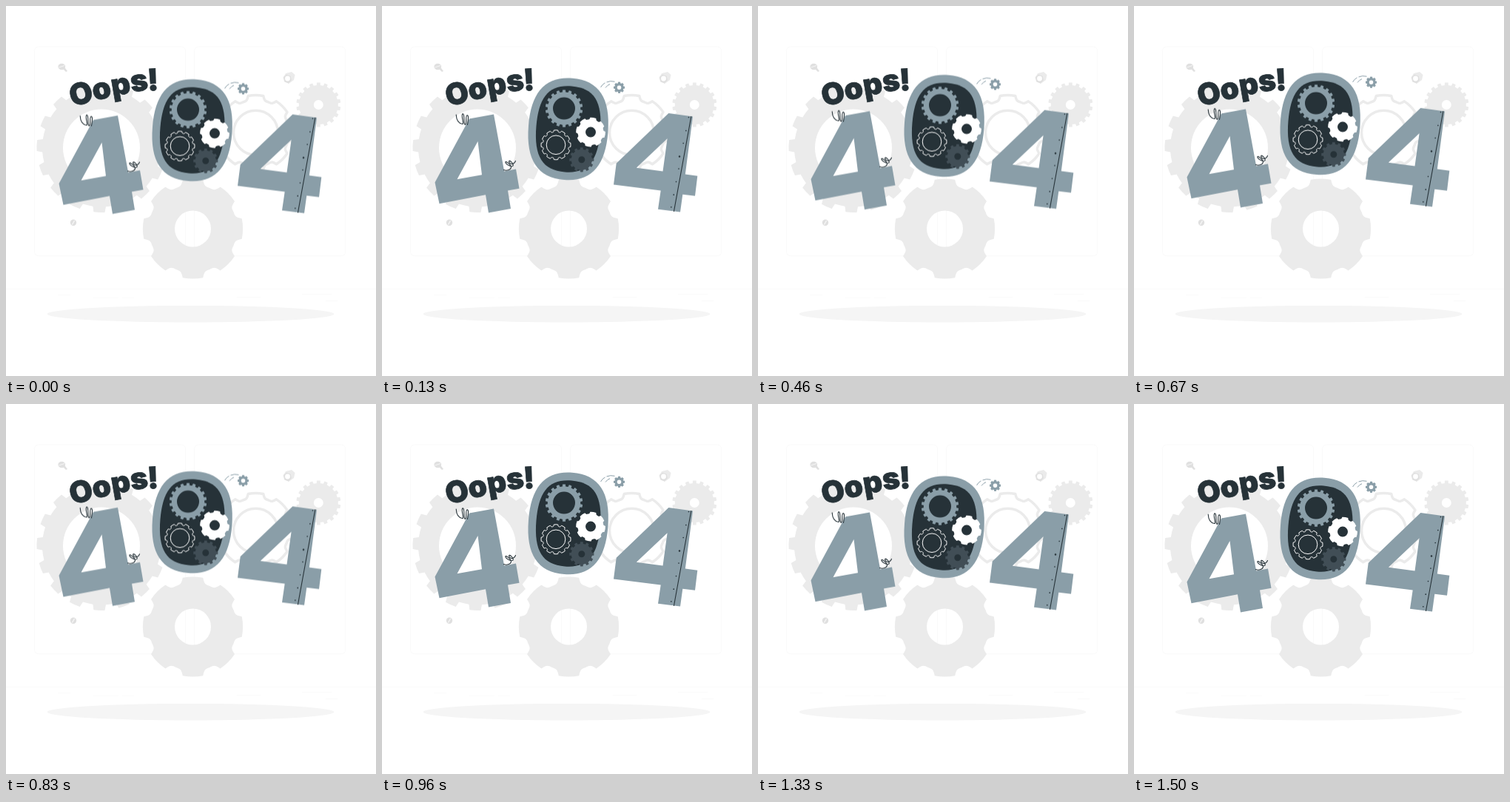
Recreate the animation shown at these times as an HTML page. Size 500 px wide and 500 px high, loop 1.54 s.

```html
<!DOCTYPE html>
<html lang="en">
<head>
<meta charset="utf-8">
<title>404</title>
<style>
  html, body { margin: 0; width: 100%; height: 100%; overflow: hidden; background: #fff; }
  svg { display: block; width: 100%; height: 100%; }
  .pale { fill: #ebebeb; }
  .paleLine { fill: none; stroke: #ebebeb; }
  .slate { fill: #8a9ea8; fill-rule: evenodd; }
  .dark { fill: #263238; }
  .ink { fill: none; stroke: #263238; stroke-linecap: round; }
  text { font: 900 40.5px Inter, "Open Sans", sans-serif; text-anchor: middle; fill: #263238; stroke: #263238; stroke-width: .7px; }
</style>
</head>
<body>
<svg viewBox="0 0 500 500">
  <g class="paleLine" stroke-width=".25">
    <path d="M0 382.5H500M70 390.5H87M118 394.2H152M157 394.2H173M312 393.5H344M400 389.5H440M432 398.5H448"/>
    <rect x="38.4" y="55.1" width="204.2" height="282.6" rx="5.6"/>
    <rect x="254.6" y="55.1" width="204.2" height="282.6" rx="5.6"/>
  </g>
  <ellipse cx="249.5" cy="416.2" rx="193.9" ry="11.3" fill="#f5f5f5"/>
  <g id="backGears"></g>
  <g fill="#e0e0e0">
    <path d="M76 84L79 82.5L83 88L81 89Z"/>
    <ellipse cx="75.3" cy="82" rx="4.9" ry="4.2"/>
    <path d="M71.5 83L79 80.5" stroke="#fff" stroke-width=".7"/>
    <circle cx="91" cy="292.7" r="4.2"/>
    <path d="M89.5 295.5L92.5 290" stroke="#fff"/>
    <path d="M378 91L386 89L390.5 93L389 100L382 105L376 102L374.500 97Z" fill="#ebebeb"/>
    <path d="M375 96L379 92.5L384.5 94.5L386 100L382 104.500L376.500 102.500Z"/>
    <circle cx="380.5" cy="98" r="3.4" fill="#fff"/>
  </g>
  <g id="word"></g>
  <g id="digits">
    <path class="slate" d="M118 154.500L151 148.600L165.200 225.400L181 222.600L185.500 248.700L170 251.500L174 276L144 281.400L140 257.200L77.500 269.200L71.500 240.500ZM129.500 185L101.500 236.300L135 230.200Z"/>
    <path class="slate" d="M387.300 147L420 151.500L409.800 229.600L426.300 231.700L423 258.700L406.300 256.700L403 280.500L373 276.800L376.700 251.600L313 243.400L316.700 214.700ZM385.600 181.200L343.800 220.700L379.500 225.400Z"/>
    <g class="ink" stroke-width="1.1">
      <path d="M417.800 151.500L394.500 279.500"/>
      <path d="M100.200 149C100.500 156 103 160.500 108.500 161.500C112 162 106 150 109 147.800C112 147 110 163 112.500 162.300C115.500 161 112 150.500 115.200 149.800C117.800 150 116 158 115.500 162.500"/>
      <path d="M164.500 223.500C168 225 174 224 174.500 220C174.500 217 167.500 211 166.800 213C167 216 176.500 221 177.300 217.500C177.500 214.500 172 209.500 171.500 212C172 215.500 177.500 218 180.500 211.500"/>
    </g>
    <g id="rivets" class="dark"></g>
    <path id="ring" class="slate"/>
    <path id="core" class="dark"/>
    <g id="gears"></g>
    <path d="M295.500 112Q298 107.500 301.500 106M303.500 105Q308.500 102.800 314.500 104.300M302 112.500Q304.500 109 308 107.700" fill="none" stroke="#8a9ea8"/>
  </g>
</svg>
<script>
const $ = id => document.getElementById(id);
const polar = (x, y, r, a) => (x + r * Math.cos(a)).toFixed(2) + ' ' + (y + r * Math.sin(a)).toFixed(2);
const disc = (x, y, r) => `M${x - r} ${y}a${r} ${r} 0 1 0 ${2 * r} 0a${r} ${r} 0 1 0 ${-2 * r} 0Z`;

// Square teeth, or softly scalloped ones when soft is set.
function gear({ x, y, R, r, n, at = 90, soft }) {
  const s = 2 * Math.PI / n;
  let d = '';
  for (let i = 0; i < n; i++) {
    const a = at * Math.PI / 180 + i * s;
    const p = (rad, k) => polar(x, y, rad, a + k * s);
    d += (i ? 'L' : 'M') + p(R, soft ? -.26 : -.22);
    d += `A${R} ${R} 0 0 1 ` + p(R, soft ? .26 : .22);
    d += soft
      ? `C${p(r, .34)} ${p(r, .36)} ${p(r, .5)}C${p(r, .64)} ${p(r, .66)} ${p(R, .74)}`
      : `L${p(r, .28)}A${r} ${r} 0 0 1 ${p(r, .72)}`;
  }
  return d + 'Z';
}
const solid = (g, attrs) => `<path ${attrs} fill-rule="evenodd" d="${gear(g)}${disc(g.x, g.y, g.hole)}"/>`;
const wire = (g, color, w) =>
  `<g fill="none" stroke="${color}" stroke-width="${w}" stroke-linejoin="round">
    <path d="${gear(g)}"/><circle cx="${g.x}" cy="${g.y}" r="${g.hole}"/></g>`;

$('backGears').innerHTML =
  solid({ x: 129, y: 191.5, R: 87.5, r: 80, n: 16, at: 92, hole: 52 }, 'class="pale"') +
  solid({ x: 252.5, y: 301, R: 67.6, r: 59.5, n: 8, hole: 24.5, soft: 1 }, 'class="pale"') +
  wire({ x: 337.5, y: 171.3, R: 50.8, r: 44.8, n: 8, hole: 30, soft: 1 }, '#ebebeb', 3.5) +
  solid({ x: 422.3, y: 133.5, R: 30, r: 26.5, n: 18, hole: 6.5 }, 'class="pale"');

$('gears').innerHTML =
  solid({ x: 246, y: 140.6, R: 25.2, r: 22.2, n: 18, hole: 15 }, 'class="slate"') +
  solid({ x: 282, y: 172.6, R: 19.9, r: 17.4, n: 8, at: 100, hole: 7, soft: 1 }, 'fill="#fff"') +
  wire({ x: 235, y: 189.8, R: 20, r: 17.6, n: 12, hole: 12.8, soft: 1 }, '#fff', 1) +
  solid({ x: 269.8, y: 209.8, R: 16.6, r: 14, n: 12, hole: 4.5 }, 'fill="#414e56"') +
  solid({ x: 320.5, y: 112.3, R: 7.6, r: 6, n: 8, hole: 2.8, soft: 1 }, 'class="slate"');

// Rounded zero: four curves around a centre, leaning slightly.
function zero(id, w, h, k) {
  const u = w * k, v = h * k;
  $(id).setAttribute('d', `M0 ${-h}C${u} ${-h} ${w} ${-v} ${w} 0S${u} ${h} 0 ${h}S${-w} ${v} ${-w} 0S${-u} ${-h} 0 ${-h}Z`);
  $(id).setAttribute('transform', 'translate(251.7 168.4) rotate(4.5)');
}
zero('ring', 53.9, 68.8, .67);
zero('core', 43.4, 58.2, .7);

const rivets = [[414.5, 152.5], [410.8, 170.5], [407.2, 187.5], [402, 205.5], [401, 222], [397.5, 239.5], [394.2, 257.2], [390.8, 273.8]];
$('rivets').innerHTML = rivets.map(([x, y], i) => `<circle cx="${x}" cy="${y}" r="${i === 3 ? 1.2 : .85}"/>`).join('');

// Letter, centre x and y, tilt, half height.
const letters = [['O', 101, 118, -15, 14.7], ['o', 129.3, 114.7, -13, 11.1], ['p', 155.3, 108.8, -10, 11.1], ['s', 180, 103.8, -7, 11.1], ['!', 198.5, 99.5, -3, 14.7]];
$('word').innerHTML = letters.map(([c, x, y, a, h]) =>
  `<text transform="translate(${x} ${y}) rotate(${a})" y="${h}">${c}</text>`).join('');

// Float up 10 units and back in 37 even ticks, starting one tick after the lowest point.
const loop = 1540, ticks = 37;
$('digits').animate(
  [0, -10, 0].map(y => ({ transform: `translateY(${y}px)` })),
  { duration: loop, iterations: Infinity, easing: `steps(${ticks})`, delay: -loop / ticks - 4 }
);
</script>
</body>
</html>
```
